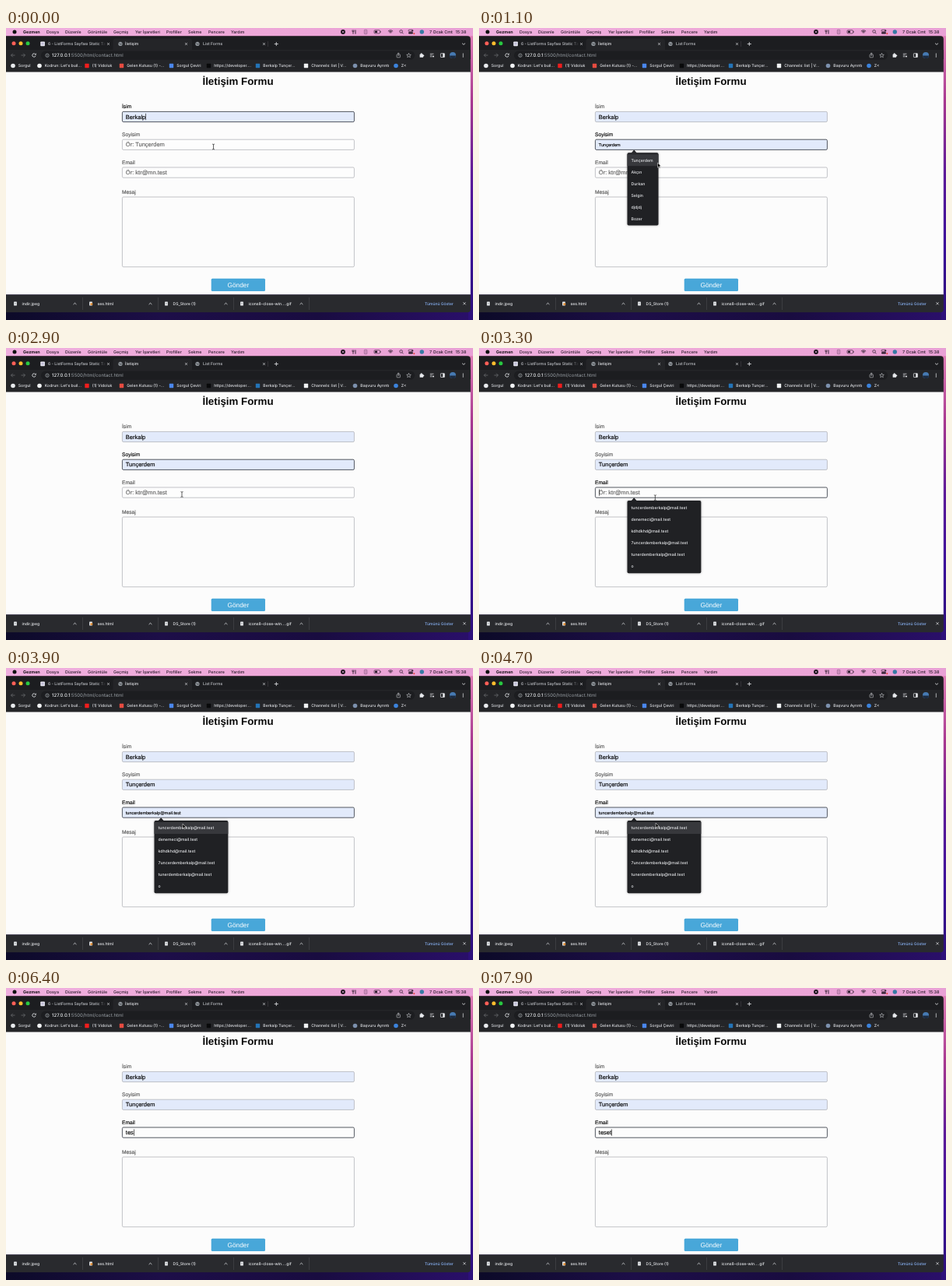
Write an HTML page with a canvas that moves like this. It is 600 px wide and 375 px high and loops after 8000 ms.

```html
<!DOCTYPE html>
<html lang="tr">
<head>
<meta charset="utf-8">
<title>İletişim</title>
<style>
html, body { margin: 0; width: 100%; height: 100%; overflow: hidden; background: #000; }
canvas { display: block; width: 600px; height: 375px; }
</style>
</head>
<body>
<canvas id="stage"></canvas>
<script>
const W = 600, H = 375, LOOP = 8000;
const UI = 'Inter, Roboto, sans-serif';
const PAGE = '"Liberation Sans", Arial, sans-serif';
const STRIP = '#1c1d20', BAR = '#242528', SHELF = '#292a2e';
const canvas = document.getElementById('stage');
const ctx = canvas.getContext('2d');
const scale = window.devicePixelRatio || 1;
canvas.width = W * scale;
canvas.height = H * scale;
ctx.textRendering = 'geometricPrecision';

const FIRST = 'Berkalp', LAST = 'Tunçerdem';
const SURNAMES = [LAST, 'Akçın', 'Durkan', 'Selgin', 'djdjdj', 'Bozer'];
const MAILS = ['tuncerdemberkalp@mail.test', 'denemeci@mail.test', 'kdhdkhd@mail.test',
  '7uncerdemberkalp@mail.test', 'tunerdemberkalp@mail.test', 'o'];

// Moments of the interaction, in ms
const OPEN_NAME = 500, PREVIEW_NAME = 800, PICK_NAME = 1950;
const OPEN_MAIL = 3050, PREVIEW_MAIL = 3450, LEAVE_MAIL = 4800;
const KEYS = [6000, 6200, 6350, 6550, 6750], TYPED = 'teset';

// Pointer path: time, x, y
const PATH = [
  [0, 266.5, 152.5], [250, 262, 151], [500, 254, 150], [1050, 229.5, 173], [1950, 228, 172],
  [2500, 226, 188], [3100, 226, 188], [3600, 227, 200], [4600, 227, 200], [5200, 228, 187], [6000, 228, 187]
];

function text(s, x, y, size, color, font = UI, weight = 500, align = 'left') {
  ctx.font = `${weight} ${size}px ${font}`;
  ctx.fillStyle = color;
  ctx.textAlign = align;
  ctx.fillText(s, x, y);
  return ctx.measureText(s).width;
}

// Form text carries a hairline stroke for a slightly fuller weight
function pageText(s, x, y, size, color) {
  const w = text(s, x, y, size, color, PAGE, 400);
  ctx.strokeStyle = color;
  ctx.lineWidth = 0.16;
  ctx.strokeText(s, x, y);
  return w;
}

function rect(x, y, w, h, color) {
  ctx.fillStyle = color;
  ctx.fillRect(x, y, w, h);
}

function box(x, y, w, h, r, fill, stroke, lw = 1) {
  ctx.beginPath();
  ctx.roundRect(x, y, w, h, r);
  if (fill) { ctx.fillStyle = fill; ctx.fill(); }
  if (stroke) { ctx.strokeStyle = stroke; ctx.lineWidth = lw; ctx.stroke(); }
}

function dot(x, y, r, color) {
  ctx.beginPath();
  ctx.arc(x, y, r, 0, 7);
  ctx.fillStyle = color;
  ctx.fill();
}

function ring(x, y, r, color, lw = 0.7, from = 0, to = 6.284) {
  ctx.beginPath();
  ctx.arc(x, y, r, from, to);
  ctx.strokeStyle = color;
  ctx.lineWidth = lw;
  ctx.stroke();
}

function line(points, color, lw = 0.7) {
  ctx.beginPath();
  for (let i = 0; i < points.length; i += 2) ctx.lineTo(points[i], points[i + 1]);
  ctx.strokeStyle = color;
  ctx.lineWidth = lw;
  ctx.stroke();
}

function poly(points, color) {
  ctx.beginPath();
  for (let i = 0; i < points.length; i += 2) ctx.lineTo(points[i], points[i + 1]);
  ctx.closePath();
  ctx.fillStyle = color;
  ctx.fill();
}

function cross(x, y, r, color) {
  line([x - r, y - r, x + r, y + r], color);
  line([x - r, y + r, x + r, y - r], color);
}

function globe(x, y) {
  dot(x, y, 2.6, '#9aa0a6');
  line([x - 2, y - 0.8, x + 0.4, y - 0.3, x + 1.8, y - 1.2], SHELF, 0.6);
  line([x - 1.2, y + 1.5, x + 0.5, y + 0.8, x + 2, y + 1], SHELF, 0.6);
}

function sheet(x, y) {
  box(x - 1.9, y - 2.5, 3.8, 5, 0.5, '#e8eaed');
}

function gradient(colors, x, y) {
  const g = ctx.createLinearGradient(0, 0, x, y);
  colors.forEach((c, i) => g.addColorStop(i / (colors.length - 1), c));
  return g;
}

function wallpaper() {
  rect(0, 0, W, H, gradient(['#e585ba', '#a8388f', '#5c1a98', '#3b1199', '#2c0f78'], 0, H));
  rect(0, 360, 594, 15, gradient(['#0c0a28', '#1d0e48', '#190c40', '#2a0f6a'], W, 0));
}

function menuBar() {
  rect(0, 0, W, 10.3, gradient(['#efafdf', '#eea8d8', '#e8a0d5'], W, 0));
  const ink = '#281a29';
  dot(11, 4.9, 2.5, '#111');
  text('Gezmen', 22, 6.9, 5.4, '#151015', UI, 700);
  const items = ['Dosya', 52, 'Düzenle', 76, 'Görüntüle', 105, 'Geçmiş', 138, 'Yer İşaretleri', 166,
    'Profiller', 206, 'Sekme', 234, 'Pencere', 260, 'Yardım', 289];
  for (let i = 0; i < items.length; i += 2) text(items[i], items[i + 1], 6.9, 5.3, ink);
  dot(433, 5, 2.9, '#171217');
  rect(432, 3.9, 0.7, 2.2, '#eab0e5');
  rect(433.4, 3.9, 0.7, 2.2, '#eab0e5');
  line([446, 2.5, 446, 7.7], ink, 0.9);
  line([449, 2.5, 449, 7.7], ink, 0.9);
  line([444.8, 2.5, 444.8, 4.5, 447.2, 4.5, 447.2, 2.5], ink, 0.5);
  box(460.3, 2.3, 3.6, 5.4, 0.7, null, '#7d5379', 0.6);
  line([462.1, 3.2, 462.1, 6.8], '#7d5379', 0.6);
  box(473, 2.8, 7.5, 4.2, 1, null, ink, 0.6);
  rect(474, 3.7, 3, 2.4, ink);
  rect(481, 4.2, 0.6, 1.5, ink);
  for (const r of [1.6, 3, 4.4]) ring(494, 7.3, r, ink, 0.8, -2.35, -0.79);
  ring(507.6, 4.4, 1.8, ink, 0.7);
  line([508.9, 5.7, 510.5, 7.4], ink, 0.7);
  box(517, 2.3, 6, 2.2, 1.1, null, ink, 0.6);
  box(517, 5.3, 6, 2.2, 1.1, ink);
  dot(522, 3.4, 0.9, ink);
  dot(524.3, 7.2, 1, '#e63d34');
  dot(534.3, 5, 2.7, '#377aa5');
  text('7 Ocak Cmt', 544, 6.9, 5.4, ink);
  text('15:38', 577.5, 6.9, 5.4, ink);
}

function tabs() {
  rect(0, 10, W, 30, STRIP);
  ['#fe5f57', '#febc2e', '#28c840'].forEach((c, i) => dot(10 + 9 * i, 19.7, 2.5, c));
  const light = '#e8eaed', soft = '#c4c7cc';
  box(137.5, 13.5, 101.5, 18, [3.5, 3.5, 0, 0], BAR);
  box(44.3, 17.5, 5.6, 5.8, 0.8, '#e9e9f2');
  rect(45.5, 19.2, 3.2, 0.6, '#7c73a8');
  rect(45.5, 20.8, 3.2, 0.6, '#7c73a8');
  const fade = ctx.createLinearGradient(118, 0, 128, 0);
  fade.addColorStop(0, soft);
  fade.addColorStop(1, STRIP);
  ctx.save();
  ctx.beginPath();
  ctx.rect(50, 14, 78, 14);
  ctx.clip();
  text('6 - ListForms Sayfası Static Tasarım', 54, 22.4, 5.1, fade);
  ctx.restore();
  globe(147, 20.4);
  text('İletişim', 153, 22.4, 5.1, light);
  globe(246, 20.4);
  text('List Forms', 253, 22.4, 5.1, soft);
  for (const x of [131.5, 231.5, 331.5]) cross(x, 20.5, 1.4, light);
  rect(336.5, 17, 0.5, 7, '#4a4b4f');
  line([344.8, 20.5, 349.8, 20.5], light, 0.8);
  line([347.3, 18, 347.3, 23], light, 0.8);
  line([586, 19.6, 588, 21.4, 590, 19.6], light, 0.8);
}

function toolbar() {
  rect(0, 28, W, 29, BAR);
  const light = '#e8eaed', dim = '#6a6c70';
  for (const [x, d] of [[9, -1], [22, 1]]) {
    line([x - 2.5, 35, x + 2.5, 35], dim, 0.8);
    line([x + d * 0.2, 32.7, x + d * 2.5, 35, x + d * 0.2, 37.3], dim, 0.8);
  }
  ring(36, 35, 2.2, light, 0.8, 0.3, 5.5);
  poly([36.6, 34.4, 38.7, 34.4, 38.7, 32.2], light);
  box(45, 29.6, 480, 11.2, 5.6, STRIP);
  ring(53, 35.2, 2.2, '#bdc1c6', 0.6);
  rect(52.7, 34.8, 0.6, 1.7, '#bdc1c6');
  rect(52.7, 33.7, 0.6, 0.6, '#bdc1c6');
  const w = text('127.0.0.1', 59, 37.2, 6, light);
  text(':5500/html/contact.html', 59 + w, 37.2, 6, '#9aa0a6', UI, 400);
  box(502, 34, 4.4, 3.8, 0.5, null, '#c4c7cc', 0.6);
  line([504.2, 36, 504.2, 32], '#c4c7cc', 0.6);
  line([502.9, 33.2, 504.2, 31.8, 505.5, 33.2], '#c4c7cc', 0.6);
  ctx.beginPath();
  for (let i = 0; i < 10; i++) {
    const a = i * Math.PI / 5 - Math.PI / 2, r = i % 2 ? 1.3 : 3;
    ctx.lineTo(517.5 + r * Math.cos(a), 35.3 + r * Math.sin(a));
  }
  ctx.closePath();
  ctx.strokeStyle = '#c4c7cc';
  ctx.lineWidth = 0.6;
  ctx.stroke();
  box(531.6, 33.5, 4.4, 4.2, 0.5, light);
  dot(533.7, 33.2, 1, light);
  dot(536.3, 35.6, 1, light);
  for (let i = 0; i < 3; i++) line([544.8, 33.2 + i * 1.8, 549.5 - (i > 0 ? 2 : 0), 33.2 + i * 1.8], light, 0.7);
  dot(549, 36.4, 1, light);
  box(558.4, 32.7, 5, 4.8, 0.5, null, light, 0.7);
  rect(561.2, 32.7, 2.2, 4.8, light);
  dot(574, 35, 4, '#467ab3');
  ctx.beginPath();
  ctx.arc(574, 35, 4, 0.1, 3.04);
  ctx.fillStyle = '#1c2b40';
  ctx.fill();
  for (let i = -1; i < 2; i++) dot(587.3, 35 + i * 1.9, 0.65, light);
}

function bookmarks() {
  // label, icon x, icon colour, square icon
  const list = [
    ['Sorgul', 9, '#e8eaed', 0], ["Kodrun: Let's buil...", 43, '#f1f3f4', 0],
    ['(1) Vidoluk', 104, '#f01d1d', 1], ['Gelen Kutusu (1) -...', 148.5, '#e54b40', 1],
    ['Sorgul Çeviri', 212.5, '#4a87ee', 1], ['https://developer....', 260.5, '#08090a', 1],
    ['Berkalp Tunçer...', 323.5, '#2374b8', 1], ['Channels: list | V...', 385.5, '#f1f3f4', 1],
    ['Başvuru Ayrıntı', 448.5, '#7c90ad', 0], ['Z<', 501, '#3c83dc', 0]
  ];
  for (const [label, x, color, square] of list) {
    if (square) box(x - 2.7, 45.8, 5.4, 5.4, 0.6, color);
    else dot(x, 48.5, 2.8, color);
    text(label, x + 6.8, 50.4, 5.1, '#e2e4e8');
  }
}

function downloads() {
  rect(0, 342.5, W, 23, SHELF);
  rect(0, 342.5, W, 0.5, '#3d3e42');
  ['indir.jpeg', 'ses.html', 'DS_Store (1)', 'icons8-close-win....gif'].forEach((name, i) => {
    const x = 12 + i * 97;
    sheet(x, 354);
    if (i === 1) dot(x + 0.8, 354.6, 1.6, '#dd8c36');
    else rect(x - 1.1, 353.6, 2.2, 0.7, '#70757a');
    text(name, x + 8.5, 355.8, 5.1, '#e8eaed');
    line([x + 74.6, 355, x + 76.5, 353.2, x + 78.4, 355], '#e8eaed', 0.8);
    rect(x + 86, 346, 0.5, 16, '#505155');
  });
  text('Tümünü Göster', 538, 355.6, 5, '#8ab4f8');
  cross(589, 353.8, 1.6, '#e8eaed');
}

function field(label, y, s) {
  pageText(label, 149, y - 3.7, 6.67, s.focus ? '#080808' : '#5b5b5b');
  box(149.4, y + 0.4, 298, 13.2, 1.5, s.filled ? '#e2eafb' : '#fdfdfd',
    s.focus ? '#4a4e58' : '#a9abb0', s.focus ? 0.95 : 0.7);
  let w = 0;
  if (s.preview) pageText(s.preview, 153.8, y + 9.3, 5.55, '#111');
  else if (s.value) w = pageText(s.value, 153.8, y + 9.6, 7.5, '#080808');
  else pageText(s.hint, 153.8, y + 9.6, 7.5, '#666');
  if (s.caret) rect(154 + w, y + 2.8, 0.6, 8.4, '#000');
}

function popup(y, w, items, active) {
  ctx.save();
  ctx.shadowColor = 'rgba(0,0,0,.35)';
  ctx.shadowBlur = 3 * scale;
  box(190.5, y, w, 93.3, 1.8, '#202124');
  ctx.restore();
  poly([195.6, y + 0.2, 199.2, y - 3.8, 202.8, y + 0.2], '#202124');
  if (active) rect(190.5, y + 2, w, 15, '#37383c');
  items.forEach((s, i) => text(s, 195.5, y + 11.3 + i * 15, 5.2, '#e8eaed'));
}

const blink = (t, start) => (t - start) % 1000 < 500;

function form(t) {
  rect(0, 56.5, W, 286, '#fcfcfc');
  text('İletişim Formu', 298, 73.4, 13.33, '#080808', PAGE, 700, 'center');

  const nameOpen = t >= OPEN_NAME && t < PICK_NAME;
  const namePreview = nameOpen && t >= PREVIEW_NAME;
  const onName = t >= OPEN_NAME && t < OPEN_MAIL;
  const onMail = t >= OPEN_MAIL;
  const mailPreview = t >= PREVIEW_MAIL && t < LEAVE_MAIL;
  const typed = TYPED.slice(0, KEYS.filter(k => t >= k).length);
  const lastKey = KEYS.filter(k => t >= k).pop() || OPEN_MAIL;

  field('İsim', 107, { value: FIRST, filled: true, focus: t < OPEN_NAME, caret: t < OPEN_NAME });
  field('Soyisim', 142.8, {
    hint: 'Ör: ' + LAST, value: t >= PICK_NAME ? LAST : '', preview: namePreview ? LAST : '',
    filled: namePreview || t >= PICK_NAME, focus: onName,
    caret: onName && !namePreview && blink(t, nameOpen ? OPEN_NAME : PICK_NAME)
  });
  field('Email', 178.6, {
    hint: 'Ör: ktr@mn.test', value: typed, preview: mailPreview ? MAILS[0] : '',
    filled: mailPreview, focus: onMail, caret: onMail && !mailPreview && blink(t, lastKey)
  });
  pageText('Mesaj', 149, 213.2, 6.67, '#5b5b5b');
  box(149.4, 217, 298, 89.8, 1.5, '#fcfcfc', '#a9abb0', 0.7);
  box(263.7, 321.7, 69.3, 16.2, 1.5, '#48a7d9');
  text('Gönder', 298.3, 332.8, 8.33, '#fff', PAGE, 400, 'center');

  if (nameOpen) popup(160.2, 40, SURNAMES, namePreview);
  if (onMail && !typed) popup(196, 94.8, MAILS, mailPreview);
}

function pointer(t) {
  if (t >= KEYS[0]) return;
  const i = PATH.findIndex(p => p[0] > t);
  const [t0, x0, y0] = PATH[i - 1], [t1, x1, y1] = PATH[i];
  let k = (t - t0) / (t1 - t0);
  k = k * k * (3 - 2 * k);
  const x = x0 + (x1 - x0) * k, y = y0 + (y1 - y0) * k;
  const inName = y > 142 && y < 157, inMail = y > 179 && y < 193 && t > PICK_NAME;
  if (inName || inMail) {
    line([x, y - 3, x, y + 3], '#222', 0.7);
    line([x - 1.5, y - 3.5, x, y - 2.9, x + 1.5, y - 3.5], '#222', 0.7);
    line([x - 1.5, y + 3.5, x, y + 2.9, x + 1.5, y + 3.5], '#222', 0.7);
    return;
  }
  const shape = [0, 0, 0, 6.2, 1.4, 4.9, 2.4, 7.1, 3.4, 6.7, 2.4, 4.5, 4.3, 4.4]
    .map((v, n) => v + (n % 2 ? y : x));
  poly(shape, '#000');
  line([...shape, x, y], '#fff', 0.5);
}

function draw(now) {
  const t = now % LOOP;
  ctx.setTransform(scale, 0, 0, scale, 0, 0);
  wallpaper();
  menuBar();
  ctx.save();
  ctx.beginPath();
  ctx.roundRect(-4, 10.3, 600.8, 355, 4);
  ctx.clip();
  tabs();
  toolbar();
  bookmarks();
  form(t);
  downloads();
  ctx.restore();
  pointer(t);
}

let start;
function tick(now) {
  if (start === undefined) start = now;
  draw(now - start);
  requestAnimationFrame(tick);
}
requestAnimationFrame(tick);
</script>
</body>
</html>
```
